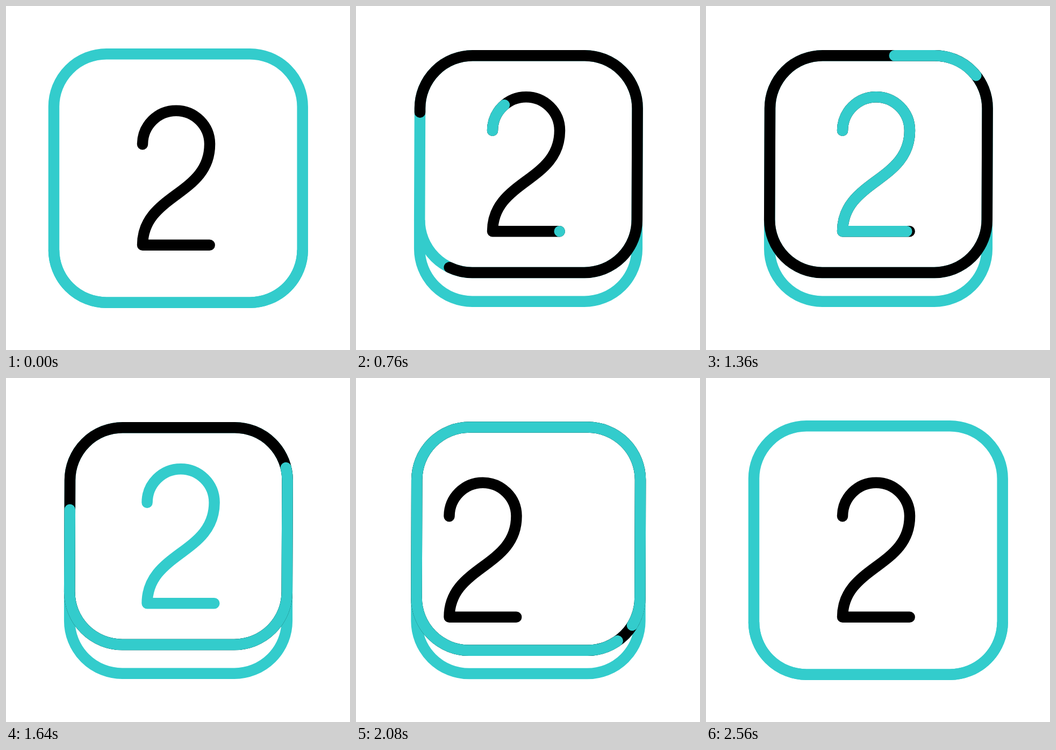
These frames come from a looping animation (640x640 px, 2.8 s). An HTML page:

```html
<!DOCTYPE html>
<html lang="en">
<head>
<meta charset="utf-8">
<title>Key press</title>
<style>
  html, body { margin: 0; width: 100%; height: 100%; overflow: hidden; background: #fff; }
  svg { display: block; width: 100vw; height: 100vh; }
  path { fill: none; stroke-width: 20.5; stroke-linecap: round; stroke-linejoin: round; }
  .teal { stroke: #33cccc; }
  .ink { stroke: #000; }
  #base { stroke-linecap: butt; }
</style>
</head>
<body>
<svg viewBox="0 0 640 640">
  <defs>
    <clipPath id="inside"><path id="hole"/></clipPath>
  </defs>
  <path id="base" class="teal"/>
  <g clip-path="url(#inside)">
    <path id="digitInk" class="ink"/>
    <path id="digitTeal" class="teal"/>
  </g>
  <path id="face" class="teal"/>
  <path id="faceInk" class="ink" pathLength="1000"/>
  <path id="faceTeal" class="teal" pathLength="1000"/>
</svg>
<script>
const LOOP = 2800, STEP = 40, R = 98;
const REST_Y = 257.3, PRESSED_Y = 231.8, SLIDE = 295;
const $ = id => document.getElementById(id);
const mix = (a, b, p) => a + (b - a) * p;
const span = (t, a, b) => Math.min(1, Math.max(0, (t - a) / (b - a)));
const smooth = u => u * u * (3 - 2 * u);

// Bezier easing with flat ends; a and b are the x handles.
function ease(u, a, b) {
  let lo = 0, hi = 1;
  for (let i = 0; i < 30; i++) {
    const v = (lo + hi) / 2, w = 1 - v;
    if (3 * v * w * w * a + 3 * v * v * w * b + v * v * v < u) lo = v; else hi = v;
  }
  return smooth(lo);
}

function faceShape(l, r, top, bottom, skew) {
  const arc = (x, y) => `A${R} ${R} 0 0 1 ${x} ${y}`;
  return `M${l + skew} ${top + R}${arc(l + skew + R, top)}H${r + skew - R}` +
    `${arc(r + skew, top + R)}L${r} ${bottom - R}${arc(r - R, bottom)}` +
    `H${l + R}${arc(l, bottom - R)}Z`;
}

function trim(el, start, len, total) {
  el.style.display = len > 0 ? '' : 'none';
  if (len >= 1) {
    el.removeAttribute('stroke-dasharray');
    return;
  }
  el.setAttribute('stroke-dasharray', `${len * total} ${(1 - len) * total}`);
  el.setAttribute('stroke-dashoffset', -start * total);
}

function place(el, x, y, visible) {
  el.setAttribute('transform', `translate(${x} ${y})`);
  el.style.display = visible ? '' : 'none';
}

for (const id of ['digitInk', 'digitTeal']) {
  $(id).setAttribute('d', 'M254 0A62.5 62.5 0 0 1 379 0' +
    'C379 48 347.5 71 316.5 94S254 140 254 187.5H378.7');
}
$('digitTeal').setAttribute('pathLength', 1000);

function draw(t) {
  const press = smooth(span(t, 66, 702)) - smooth(span(t, 1970, 2360));
  const l = mix(89, 118.2, press), r = mix(551.7, 522.8, press);
  const top = mix(89.2, 92.2, press);
  const low = mix(551.7, 496, press), floor = mix(551.7, 549.7, press);

  const shape = faceShape(l, r, top, low, 0.8 * press);
  for (const id of ['hole', 'face', 'faceInk', 'faceTeal']) $(id).setAttribute('d', shape);
  $('base').setAttribute('d', `M${l} ${low - R}V${floor - R}A${R} ${R} 0 0 0 ${l + R} ${floor}` +
    `H${r - R}A${R} ${R} 0 0 0 ${r} ${floor - R}V${low - R}`);

  // Outline: black runs round the face, then teal runs round over it.
  const teal = ease(span(t, 985, 2348), 0.62, 0.222);
  const ink = t < 2348 ? ease(span(t, 67, 1169), 0.62, 0.38) : 0;
  trim($('faceInk'), -0.1037 + (t - 440) * 0.000308, ink > 0.9999 ? 1 : ink, 1000);
  trim($('faceTeal'), 0.1986 + (t - 1360) * 0.000506, t < 2348 ? teal : 0, 1000);

  // Digit: turns teal, leaves to the right, returns black from the left.
  const back = t >= 1820;
  const inkX = back ? -SLIDE * (1 - span(t, 1820, 2560)) ** 3 : 0;
  const inkY = back ? REST_Y : mix(REST_Y, PRESSED_Y, press);
  place($('digitInk'), inkX, inkY, t < 1420 || back);

  const tint = smooth(span(t, 606, 1406));
  trim($('digitTeal'), 0, tint, 1000);
  place($('digitTeal'), SLIDE * span(t, 1480, 2000) ** 3,
    t < 1000 ? mix(REST_Y, PRESSED_Y, press) : PRESSED_Y, tint > 0 && t < 2000);
}

const begin = performance.now();
function tick() {
  const t = (performance.now() - begin) % LOOP;
  draw(Math.floor(t / STEP) * STEP);
  requestAnimationFrame(tick);
}
draw(0);
requestAnimationFrame(tick);
</script>
</body>
</html>
```
